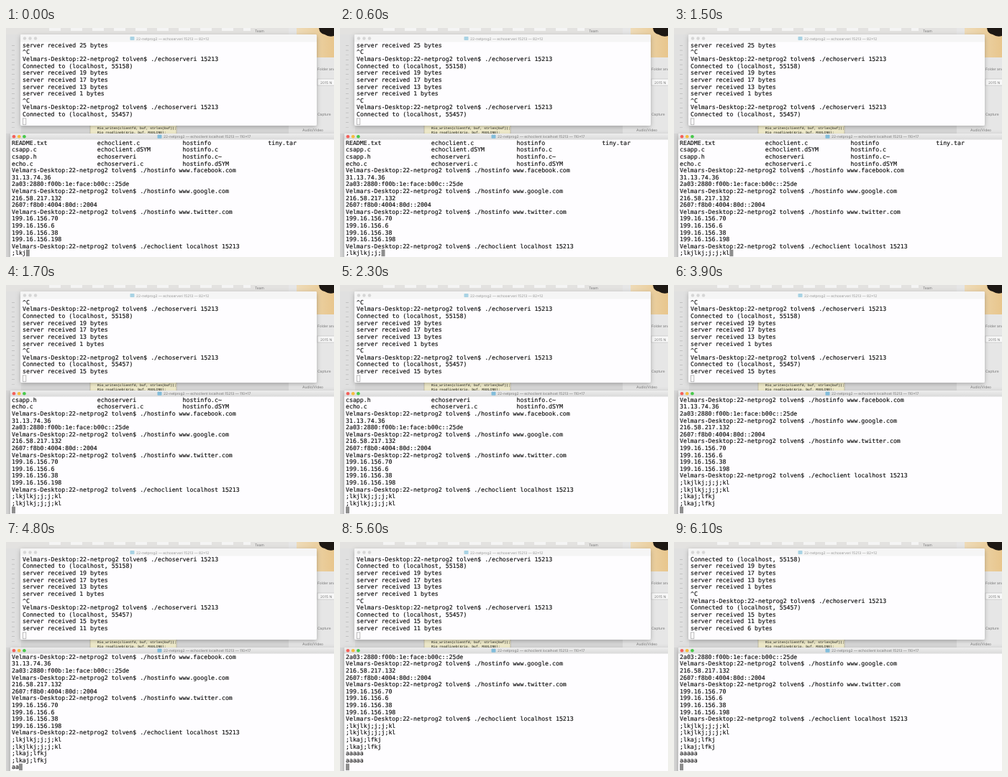
An HTML page that plays this animation: 456 px wide and 319 px high, repeating every 6.2 s.

```html
<!DOCTYPE html>
<html lang="en">
<head>
<meta charset="utf-8">
<title>Echo server session</title>
<style>
  html, body { margin: 0; width: 100%; height: 100%; overflow: hidden; background: #d6d6d6; }
  svg { display: block; width: 456px; height: 319px; }
  text { white-space: pre; text-rendering: geometricPrecision; }
  .term text { font: 8.23px "DejaVu Sans Mono", monospace; fill: #111; stroke: #111; stroke-width: .16px; }
  .ui { font: 4.95px Inter, Roboto, sans-serif; fill: #777; }
  .code { font: bold 4.7px "Liberation Mono", monospace; fill: #55554a; }
</style>
</head>
<body>
<svg viewBox="0 0 456 319" xmlns="http://www.w3.org/2000/svg">
  <defs>
    <linearGradient id="bar" x2="0" y2="1">
      <stop stop-color="#ededed"/><stop offset="1" stop-color="#dadada"/>
    </linearGradient>
    <linearGradient id="wall" x2="1" y2="0">
      <stop stop-color="#eedbb8"/><stop offset="1" stop-color="#e8c68d"/>
    </linearGradient>
    <filter id="shadow" x="-10%" y="-10%" width="120%" height="125%">
      <feDropShadow dx="0" dy="2" stdDeviation="3" flood-opacity=".25"/>
    </filter>
  </defs>

  <!-- desktop behind the terminals -->
  <rect width="456" height="319" fill="#d6d6d6"/>
  <rect width="404" height="9" fill="#e3e2e0"/>
  <path d="M60 2H340" stroke="#f4f4f4" stroke-width="4" stroke-dasharray="16 14"/>
  <text class="ui" x="346" y="6">Team</text>
  <rect y="9" width="21" height="138" fill="#e0e0e0"/>
  <path d="M10 24V143" stroke="#b8b8b8" stroke-width="4" stroke-dasharray=".7 6"/>
  <rect x="21" y="134" width="372" height="14" fill="#d8d8d8"/>
  <rect x="117" y="134" width="120" height="14" fill="#f2edcc" stroke="#aaa68d" stroke-width=".6"/>
  <g class="code">
    <text x="127" y="141">Rio_writen(clientfd, buf, strlen(buf));</text>
    <text x="127" y="146.8">Rio_readlineb(&amp;rio, buf, MAXLINE);</text>
  </g>
  <rect x="393" width="63" height="148" fill="#e6e6e6"/>
  <rect x="404" width="52" height="41" fill="url(#wall)"/>
  <path d="M435 0Q436 8 443 9Q449 13 456 11V0Z" fill="#1d1814"/>
  <g class="ui">
    <text x="433" y="58.5">Folder and Font</text>
    <rect x="433" y="71" width="26" height="9" fill="#f8f8f8" stroke="#bbb" stroke-width=".6"/>
    <text x="437" y="77.5">2015 N</text>
    <text x="433" y="121.5">Capture</text>
    <text x="412" y="143.5" font-size="5">Audio/Video</text>
  </g>

  <g filter="url(#shadow)">
    <rect x="20" y="9" width="412" height="127" rx="2" fill="#fefdff"/>
    <path d="M20 19.5V11Q20 9 22 9H430Q432 9 432 11V19.5Z" fill="#f5f5f5"/>
  </g>
  <g fill="#d6d6d6">
    <circle cx="26" cy="14.5" r="2.2"/><circle cx="33.5" cy="14.5" r="2.2"/><circle cx="41" cy="14.5" r="2.2"/>
  </g>
  <rect x="172.5" y="12" width="6" height="5" rx=".7" fill="#a9d3e4"/>
  <text class="ui" x="181" y="16.6" fill-opacity=".75">22-netprog2 — echoserveri 15213 — 82×12</text>
  <g class="term" id="server"></g>
  <rect id="idle" x="23.4" y="125.9" width="4.4" height="8.8" fill="none" stroke="#aaa" stroke-width=".8"/>

  <g filter="url(#shadow)">
    <rect x="6" y="147" width="456" height="180" rx="2" fill="#fefdff"/>
    <path d="M6 155.5V149Q6 147 8 147H456V155.5Z" fill="url(#bar)"/>
  </g>
  <circle cx="11" cy="151.2" r="2.3" fill="#f4605a"/>
  <circle cx="18.2" cy="151.2" r="2.3" fill="#f6bd3f"/>
  <circle cx="25.4" cy="151.2" r="2.3" fill="#48c94b"/>
  <rect x="210.5" y="148.8" width="6" height="5" rx=".7" fill="#82bddb"/>
  <text class="ui" x="219" y="153.2">22-netprog2 — echoclient localhost 15213 — 110×17</text>
  <rect id="cursor" y="308.7" width="5" height="9.4" fill="#8e8e8e"/>
  <g class="term" id="client"></g>
</svg>
<script>
const LOOP = 6200, CHAR = 4.955;
const PROMPT = 'Velmars-Desktop:22-netprog2 tolven$ ';

// keys: [time, characters typed so far]; sent and served: when each window prints
const rounds = [
  { text: ';lkjlkj;j;j;kl', keys: [[0, 4], [200, 6], [400, 9], [600, 10], [800, 14]], sent: 1600, served: 1700 },
  { text: ';lkaj;lfkj', keys: [[3000, 2], [3200, 5], [3400, 10]], sent: 3900, served: 4000 },
  { text: 'aaaaa', keys: [[4500, 1], [4700, 2], [4900, 4], [5000, 5]], sent: 5300, served: 5700 },
];

const received = n => `server received ${n} bytes`;
const columns = (...names) => names.map(n => n.padEnd(24)).join('').trimEnd();
const lookup = host => PROMPT + './hostinfo ' + host;

const serverLog = [
  received(25), '^C',
  PROMPT + './echoserveri 15213', 'Connected to (localhost, 55158)',
  ...[19, 17, 13, 1].map(received), '^C',
  PROMPT + './echoserveri 15213', 'Connected to (localhost, 55457)',
];
const clientLog = [
  columns('README.txt', 'echoclient.c', 'hostinfo', 'tiny.tar'),
  columns('csapp.c', 'echoclient.dSYM', 'hostinfo.c'),
  columns('csapp.h', 'echoserveri', 'hostinfo.c~'),
  columns('echo.c', 'echoserveri.c', 'hostinfo.dSYM'),
  lookup('www.facebook.com'), '31.13.74.36', '2a03:2880:f00b:1e:face:b00c::25de',
  lookup('www.google.com'), '216.58.217.132', '2607:f8b0:4004:80d::2004',
  lookup('www.twitter.com'), ...[70, 6, 38, 198].map(n => '199.16.156.' + n),
  PROMPT + './echoclient localhost 15213',
];

function makeRows(id, count, x, firstBaseline, pitch) {
  const group = document.getElementById(id);
  return Array.from({ length: count }, (_, i) => {
    const row = document.createElementNS('http://www.w3.org/2000/svg', 'text');
    row.setAttribute('x', x);
    row.setAttribute('y', firstBaseline + i * pitch);
    return group.appendChild(row);
  });
}

const serverRows = makeRows('server', 12, 23, 26.6, 9.65);
const clientRows = makeRows('client', 17, 8, 162.8, 9.6);
const cursor = document.getElementById('cursor');

function show(rows, lines) {
  const visible = lines.slice(-rows.length);
  rows.forEach((row, i) => {
    if (row.textContent !== visible[i]) row.textContent = visible[i];
  });
}

function render(t) {
  const server = [...serverLog], client = [...clientLog];
  let typed = '';
  for (const { text, keys, sent, served } of rounds) {
    if (t >= served) server.push(received(text.length + 1));
    if (t >= sent) client.push(text, text);
    else typed += text.slice(0, keys.reduce((n, [at, count]) => t >= at ? count : n, 0));
  }
  show(serverRows, [...server, '']);
  show(clientRows, [...client, typed]);
  cursor.setAttribute('x', 8 + typed.length * CHAR);
}

const start = performance.now();
function tick() {
  render((performance.now() - start) % LOOP);
  requestAnimationFrame(tick);
}
tick();
</script>
</body>
</html>
```
